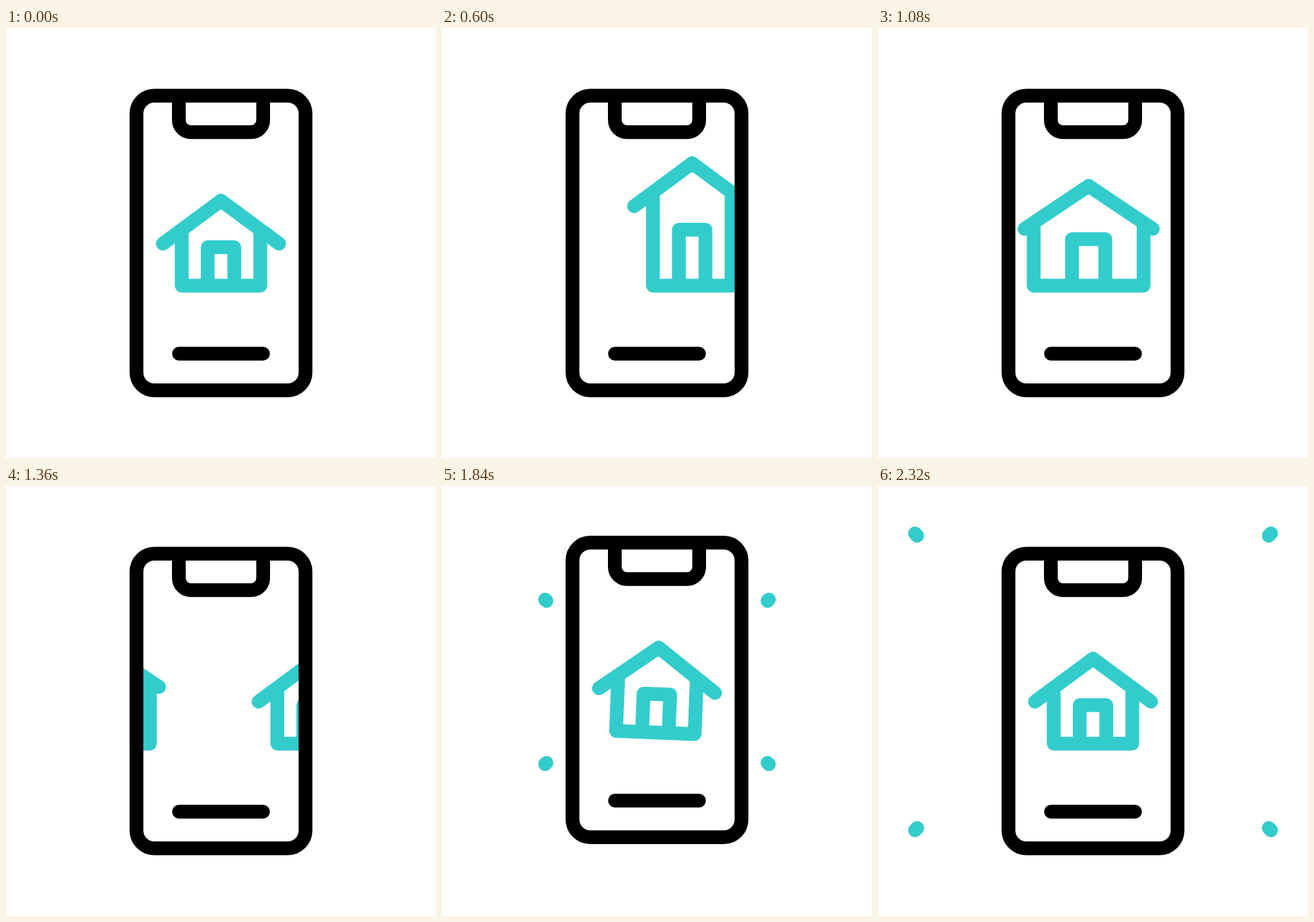
An HTML page that plays this animation: 640x640 px, repeating every 2.36 s.

```html
<!DOCTYPE html>
<html lang="en">
<head>
<meta charset="utf-8">
<title>House listing on a phone</title>
<style>
  html, body { margin: 0; width: 100%; height: 100%; overflow: hidden; background: #fff; }
  svg { display: block; width: 100%; height: 100%; }
  path, rect { fill: none; stroke-width: 20.5; stroke-linecap: round; stroke-linejoin: round; }
  .teal { stroke: #3cc; }
  .black { stroke: #000; }
</style>
</head>
<body>
<svg viewBox="0 0 640 640">
  <clipPath id="screen"><rect x="204" y="110.5" width="232" height="419" rx="16"/></clipPath>
  <path id="rays" class="teal"/>
  <g id="phone">
    <g clip-path="url(#screen)"><g id="tilt"><path id="houses" class="teal"/></g></g>
    <rect class="black" x="194.2" y="100.7" width="251.6" height="438.6" rx="26.5"/>
    <path class="black" d="M257.25 104V137a18 18 0 0 0 18 18H364.75a18 18 0 0 0 18-18V104M257.5 484.7H382.5"/>
  </g>
</svg>
<script>
const LOOP = 2360, STEP = 40, GAP = 330, BASE = 383.4;
const $ = id => document.getElementById(id);

// Half widths of wall, roof and door; heights of the apex and door top
function house(x, wall, roof, door, apex, top) {
  const slope = 64 / roof, wallTop = apex + wall * slope;
  return `M${x - roof} ${apex + 64}L${x} ${apex}L${x + roof} ${apex + 64}` +
    `M${x - wall} ${wallTop}V${BASE}H${x + wall}V${wallTop}` +
    `M${x - door} ${BASE}V${top}H${x + door}V${BASE}`;
}

const small = x => house(x, 58.5, 86.5, 19.8, 257, 326.3);
$('houses').setAttribute('d',
  small(320) +
  house(320 + GAP, 58.5, 86.5, 19.8, 201.3, 300.3) +
  house(320 + 2 * GAP, 81.8, 95.5, 24.8, 235, 314.3) +
  small(320 + 3 * GAP));

const smooth = u => u * u * (3 - 2 * u);

// Interpolates [time, value, speed] keys; a missing speed means rest
function track(keys, t) {
  if (t <= keys[0][0]) return keys[0][1];
  for (let i = 1; i < keys.length; i++) {
    const [t0, a, va = 0] = keys[i - 1], [t1, b, vb = 0] = keys[i];
    if (t > t1) continue;
    const d = t1 - t0, u = (t - t0) / d, w = 1 - u;
    return a + (b - a) * smooth(u) + d * u * w * (va * w - vb * u);
  }
  return keys[keys.length - 1][1];
}

const scroll = [[100, 0], [400, 103, .67], [760, GAP + 100, .86],
  [1080, 2 * GAP + 6.5, .68], [1680, 3 * GAP - 15, .17], [1840, 3 * GAP]];
const bounce = [[1560, 0], [1800, -20], [2020, 20], [2310, 0]];
const lean = [[1580, 0], [2000, 3.35], [2310, 0]];
const rayOut = [[1800, 164.5], [2270, 265]];
const rayIn = [[2000, 164.5], [2360, 265]];

function rays(t) {
  const a = track(rayIn, t), b = track(rayOut, t);
  if (b <= 164.5) return '';
  let d = '';
  for (const sx of [-1, 1]) for (const sy of [-1, 1]) {
    const point = k => `${320 + sx * k} ${291.5 + sy * (k - 44)}`;
    d += `M${point(a)}L${point(b)}`;
  }
  return d;
}

function draw(now) {
  const t = Math.floor(now % LOOP / STEP) * STEP;
  $('houses').setAttribute('transform', `translate(${-track(scroll, t)})`);
  $('tilt').setAttribute('transform', `rotate(${track(lean, t)} 320 321)`);
  $('phone').setAttribute('transform', `translate(0 ${track(bounce, t)})`);
  $('rays').setAttribute('d', rays(t));
}

const start = performance.now();
function frame() {
  draw(performance.now() - start);
  requestAnimationFrame(frame);
}
frame();
</script>
</body>
</html>
```
